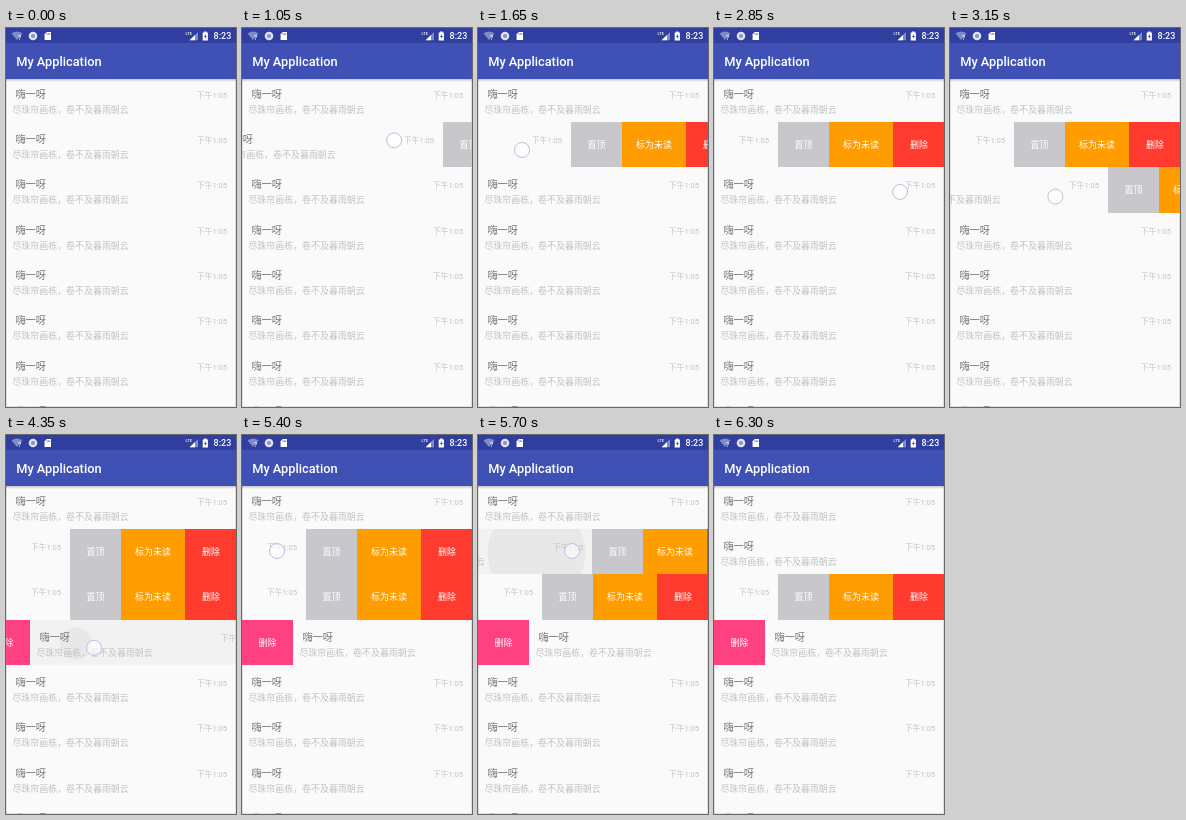
Animation of 230x379 px, one loop 7.05 s. Source, as an HTML page:

```html
<!DOCTYPE html>
<html lang="zh-CN">
<head>
<meta charset="utf-8">
<style>
  html, body { margin: 0; width: 100%; height: 100%; overflow: hidden; background: #fafafa; }
  svg { display: block; }
  text { font-family: Roboto, "Noto Sans CJK SC", "Noto Sans CJK", sans-serif; white-space: pre; }
  .title { font-size: 10.24px; font-weight: 500; fill: #777; }
  .note { font-size: 8.96px; fill: #c2c2c2; }
  .time { font-size: 7.68px; fill: #c2c2c2; text-anchor: end; }
  .button { font-size: 8.96px; fill: #fff; text-anchor: middle; }
  .bar { fill: #fff; font-weight: 500; }
</style>
</head>
<body>
<svg width="230" height="379" viewBox="0 0 230 379">
  <defs>
    <linearGradient id="shade" x2="0" y2="1">
      <stop stop-opacity=".22"/>
      <stop offset="1" stop-opacity="0"/>
    </linearGradient>
  </defs>
  <rect width="230" height="379" fill="#fafafa"/>
  <path d="M.5 51V378.5H229.5V51" fill="none" stroke="#000" stroke-opacity=".1"/>
  <g id="list"></g>
  <rect y="51" width="230" height="3" fill="url(#shade)"/>
  <rect width="230" height="51" fill="#3f51b5"/>
  <rect width="230" height="15" fill="#303f9f"/>
  <text class="bar" x="10.2" y="37.8" font-size="12.8">My Application</text>
  <text class="bar" x="207.6" y="11.2" font-size="8.96">8:23</text>
  <g fill="#fff">
    <path d="M5.5 5.5Q11 1.5 16.5 5.5L11 12Z" opacity=".4"/>
    <text class="bar" x="12" y="12" font-size="6.5">?</text>
    <circle cx="27" cy="8" r="4.3" opacity=".85"/>
    <circle cx="27" cy="8" r="2" fill="#303f9f" opacity=".5"/>
    <path d="M40.8 4H45V12H38.6V6.2Z"/>
    <path d="M41 5.3v1.7M42.4 5.3v1.7M43.8 5.3v1.7" stroke="#303f9f" stroke-width=".6"/>
    <path d="M192 4V12.3H183.7Z" opacity=".4"/>
    <path d="M189 7V12.3H183.7Z"/>
    <text class="bar" x="179.6" y="7.2" font-size="4">LTE</text>
    <path d="M198.1 3.5h2.4v1h1.4v8h-5.2v-8h1.4Z"/>
    <path d="M199.7 6l-1.6 3h1.2v2l1.5-3h-1.1Z" fill="#303f9f"/>
  </g>
  <circle id="touch" r="7.5" fill="#fff" fill-opacity=".6" stroke="#b9c0e2"/>
</svg>
<script>
const LOOP = 7050, STEP = 150, SLOP = 9, SETTLE = 300;
const OPEN_LEFT = -166, OPEN_RIGHT = 51;
const list = document.getElementById('list');
const touch = document.getElementById('touch');

const rowTop = i => Math.round(48.8 + 45.3 * i);

const button = (x, w, color, label) =>
  `<rect x="${x}" width="${w}" height="46" fill="${color}"/>
   <text class="button" x="${x + w / 2}" y="26.1">${label}</text>`;

const row = i => `<svg y="${rowTop(i)}" width="230" height="${rowTop(i + 1) - rowTop(i)}"><g>
  <g class="press" opacity="0">
    <rect width="230" height="46" opacity=".03"/>
    <circle cy="23.5" opacity=".045"/>
  </g>
  <text class="title" x="9.4" y="20.8">嗨一呀</text>
  <text class="time" x="221.2" y="20.8">下午1:05</text>
  <text class="note" x="6.4" y="36.4">尽珠帘画栋，卷不及暮雨朝云</text>
  ${button(-51, 51, '#ff4081', '删除')}
  ${button(230, 51, '#c7c7cc', '置顶')}
  ${button(281, 64, '#ff9d00', '标为未读')}
  ${button(345, 52, '#ff3b30', '删除')}
</g></svg>`;

list.innerHTML = Array.from({ length: 8 }, (_, i) => row(i)).join('');

// Each swipe: finger goes down, drags a row, lifts, and the row settles at rest
const swipes = [
  { row: 1, down: 600, move: 750, lift: 1650, from: [190, 109], to: [44, 122], base: 0, rest: OPEN_LEFT },
  { row: 2, down: 2850, move: 2850, lift: 3400, from: [186, 164], to: [44, 172], base: 0, rest: OPEN_LEFT },
  { row: 3, down: 4200, move: 4200, lift: 4450, from: [55, 207], to: [106, 216], base: 0, rest: OPEN_RIGHT, ripple: true },
  { row: 1, down: 5400, move: 5400, lift: 5950, from: [35, 116], to: [139, 116], base: OPEN_LEFT, rest: 0, ripple: true }
];

const unit = v => Math.min(1, Math.max(0, v));
const mix = (a, b, p) => a + (b - a) * p;
const smooth = p => p * p * (3 - 2 * p);
const easeOut = p => 1 - (1 - p) ** 3;

function set(node, attrs) {
  for (const name in attrs) node.setAttribute(name, attrs[name]);
}

function drawSwipe(s, t) {
  const drag = smooth(unit((t - s.move) / (s.lift - s.move)));
  const settle = unit((t - s.lift) / SETTLE);
  const [x, y] = s.from.map((v, i) => mix(v, s.to[i], drag));
  const dx = x - s.from[0];
  const pulled = s.base + Math.sign(dx) * Math.max(0, Math.abs(dx) - SLOP);
  const offset = Math.round(mix(pulled, s.rest, easeOut(settle)));

  const body = list.children[s.row].firstElementChild;
  set(body, { transform: `translate(${offset})` });
  if (s.ripple) {
    const age = t - s.down, r = 49 * (age / 300) ** 1.6;
    const press = body.firstElementChild;
    set(press, { opacity: unit(age / STEP) * (1 - settle) });
    set(press.lastElementChild, { cx: s.from[0] - s.base - r * .54, r });
  }
  set(touch, { cx: x, cy: y, opacity: unit(1 - (t - s.lift) / 200) });
}

function draw(now) {
  const t = Math.floor(now % LOOP / STEP) * STEP;
  for (const { firstElementChild: body } of list.children) {
    set(body, { transform: 'translate(0)' });
    set(body.firstElementChild, { opacity: 0 });
  }
  set(touch, { opacity: 0 });
  for (const s of swipes) if (t >= s.down) drawSwipe(s, t);
}

function tick() {
  draw(performance.now());
  requestAnimationFrame(tick);
}
tick();
</script>
</body>
</html>
```
